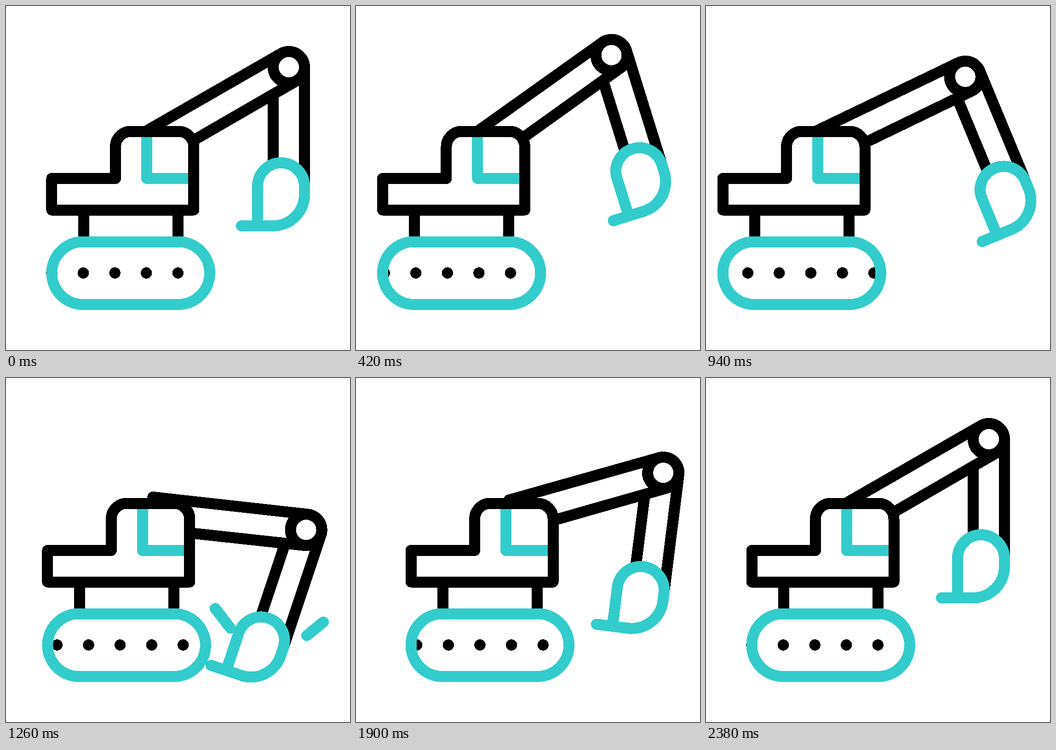
An HTML page for the animation above (2400 ms loop, 748 by 748 pixels).

```html
<!DOCTYPE html>
<html lang="en">
<head>
<meta charset="utf-8">
<title>Excavator</title>
<style>
  html, body { margin: 0; width: 100%; height: 100%; overflow: hidden; background: #fff; }
  svg { display: block; width: 100%; height: 100%; fill: none; stroke: #000; stroke-width: 24; stroke-linejoin: round; shape-rendering: crispEdges; }
  .teal { stroke: #3cc; }
  .round { stroke-linecap: round; }
  .white { fill: #fff; }
</style>
</head>
<body>
<svg viewBox="0 0 748 748">
  <g id="machine">
    <g id="boom">
      <g id="stick">
        <path d="M649 133V396M581 158V347"/>
        <path class="teal round" d="M512 478H581A68 68 0 0 0 649 410V392A51 51 0 0 0 547 392V478"/>
      </g>
      <path class="white round" d="M370 314L632 162.500L598 103.500L304 272.500"/>
      <circle class="white" cx="615" cy="133" r="34"/>
    </g>
    <path d="M169 444V512M374 444V512"/>
    <path class="white" d="M99.500 375H238V306.500A34 34 0 0 1 272 272.500H374.500A34 34 0 0 1 408.500 306.500V443.500H99.500Z"/>
    <path class="teal" d="M306 284.500V375H396.500"/>
    <g id="wheels" fill="#000" stroke="none"></g>
    <rect class="teal" x="99.500" y="512.500" width="343.500" height="136.500" rx="68.250"/>
  </g>
  <g id="sparks" class="teal round">
    <path pathLength="1" d="M488 544L444 487"/>
    <path pathLength="1" d="M654 560L702 521"/>
  </g>
</svg>
<script>
const LOOP = 2400, SPACING = 68.6, WHEELS = 5;
const [machine, boom, stick, wheels, sparks] =
  ['machine', 'boom', 'stick', 'wheels', 'sparks'].map(id => document.getElementById(id));

wheels.innerHTML = '<circle cy="580.500" r="12.200"/>'.repeat(WHEELS);

const ease = (t, start, end) => {
  const p = Math.min(1, Math.max(0, (t - start) / (end - start)));
  return p * p * (3 - 2 * p);
};

function draw(t) {
  // Chassis: back up, drive forward, settle
  const retreat = ease(t, 0, 785), advance = ease(t, 760, 1630), settle = ease(t, 1560, 2370);
  const drive = -75 * retreat + 107.5 * advance - 32.5 * settle;
  const roll = SPACING * (1.9 * retreat - 0.98 * advance - 1.92 * settle);

  // Arm: raise, strike the ground, recover
  const recover = ease(t, 1258, 2375);
  const lift = -9.6 * ease(t, 0, 760) + 46.1 * ease(t, 745, 1285) - 36.5 * recover;
  const swing = -31.4 * ease(t, 0, 790) + 49.9 * ease(t, 820, 1270) - 18.5 * recover;

  machine.setAttribute('transform', `translate(${drive})`);
  boom.setAttribute('transform', `rotate(${lift} 337 303)`);
  stick.setAttribute('transform', `rotate(${swing - lift} 615 133)`);

  const span = SPACING * WHEELS;
  [...wheels.children].forEach((wheel, i) =>
    wheel.setAttribute('cx', 99.5 + (i * SPACING + roll + span) % span));

  const head = ease(t, 1180, 1300), tail = 0.99 * ease(t, 1290, 1580);
  sparks.style.display = t >= 1190 && t < 1600 ? '' : 'none';
  sparks.style.strokeDasharray = `${head - tail} 2`;
  sparks.style.strokeDashoffset = -tail;
}

function tick() {
  draw(performance.now() % LOOP);
  requestAnimationFrame(tick);
}
tick();
</script>
</body>
</html>
```
